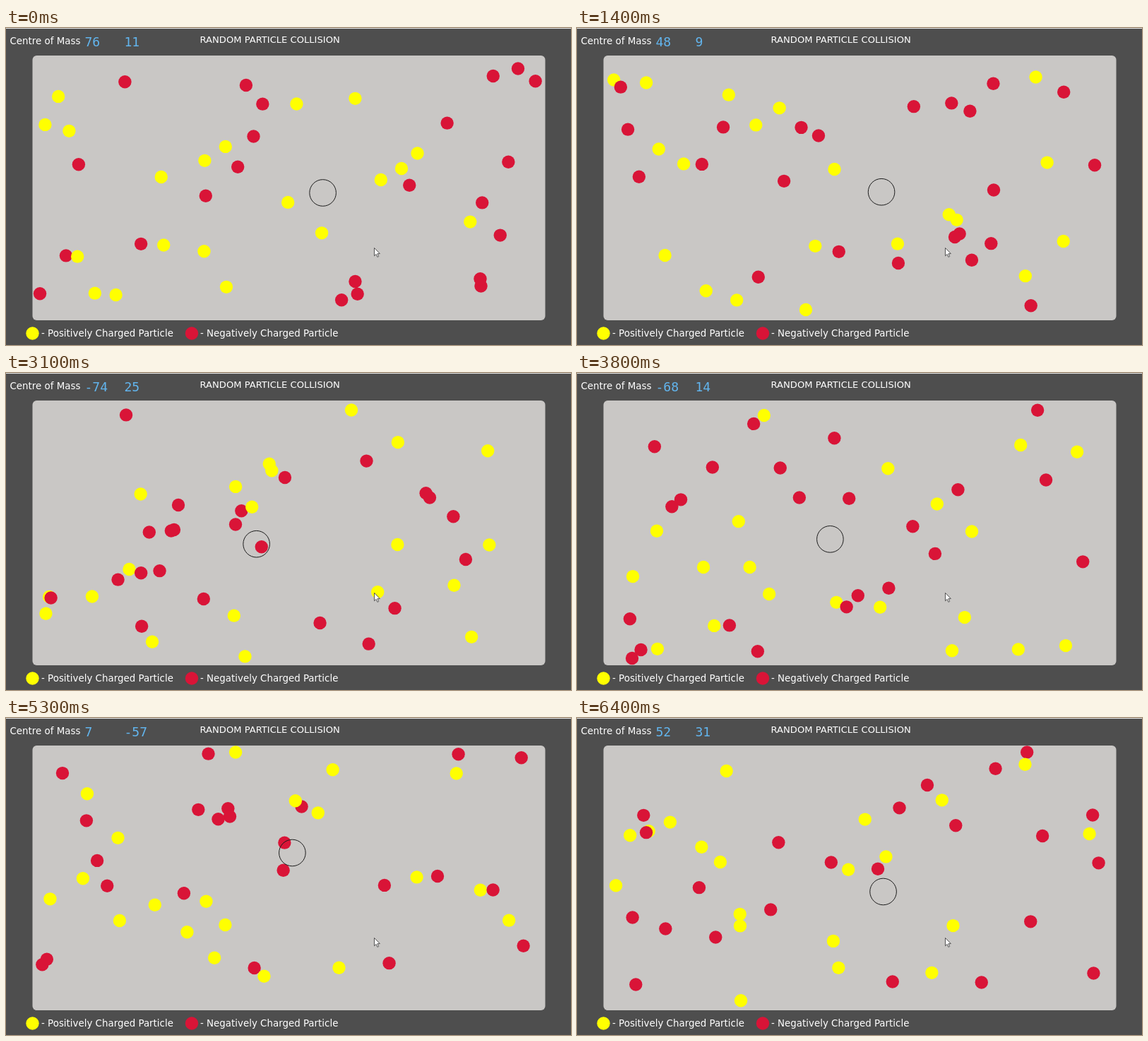
Write an HTML page that moves like this. It is 800x449 px and loops after 6500 ms.

```html
<!DOCTYPE html>
<html lang="en">
<head>
<meta charset="utf-8">
<title>Random Particle Collision</title>
<style>
  html, body { margin: 0; width: 100%; height: 100%; overflow: hidden; background: #4e4e4e; }
  svg { display: block; width: 100%; height: 100%; }
  text { font: 13.4px "DejaVu Sans", sans-serif; fill: #fff; white-space: pre; }
  .title { font-size: 13.1px; }
  .value { font: 18px "DejaVu Sans Mono", monospace; fill: #62b5ee; }
  .pos { fill: #ffff00; }
  .neg { fill: #d91437; }
</style>
</head>
<body>
<svg viewBox="0 0 800 449">
  <rect width="800" height="449" fill="#4e4e4e"/>
  <rect width="800" height="1" fill="#e4e4e4"/>
  <rect x="37.5" y="39" width="726" height="375" rx="6" fill="#c9c7c5"/>
  <text x="5.5" y="23">Centre of Mass</text>
  <text class="title" x="274.5" y="21">RANDOM PARTICLE COLLISION</text>
  <text class="value" id="valueX" x="111.5" y="26"></text>
  <text class="value" id="valueY" x="167.5" y="26"></text>
  <circle class="pos" cx="37.5" cy="432.5" r="9.2"/>
  <text x="50" y="437">- Positively Charged Particle</text>
  <circle class="neg" cx="263" cy="432.5" r="9.2"/>
  <text x="275" y="437">- Negatively Charged Particle</text>
  <g id="particles"></g>
  <circle id="centre" r="18.8" fill="none" stroke="#1c1c1c"/>
  <path d="M521.5 311.5v11.3l2.6-2.4 1.8 4 1.8-.8-1.8-3.9h3.5z" fill="#fff" stroke="#444" stroke-width=".9"/>
</svg>
<script>
const LOOP = 6500, STEP = 100;
const POSITIVE = 20, NEGATIVE = 23;
const BOX = { x: [48, 754], y: [48.5, 404.5] };

// Centre of mass: time, x, y
const centrePath = [
  [0, 76, 11], [1400, 48, 9], [2300, -33, -19], [3100, -74, 25],
  [4400, -62, 5], [5300, 7, -57], [6400, 52, 31]
];

const byId = id => document.getElementById(id);

function set(node, attrs) {
  for (const key in attrs) node.setAttribute(key, attrs[key]);
  return node;
}

let seed = 7;
function random() {
  seed = (seed * 16807) % 2147483647;
  return seed / 2147483647;
}

const between = (low, high) => low + (high - low) * random();
const speed = () => between(4, 22) * (random() < 0.5 ? -1 : 1);

// Folds endless straight travel back and forth between two walls.
function bounce(value, [low, high]) {
  const size = high - low;
  const turn = (((value - low) % (2 * size)) + 2 * size) % (2 * size);
  return low + (turn > size ? 2 * size - turn : turn);
}

function makeParticle(kind) {
  const node = document.createElementNS("http://www.w3.org/2000/svg", "circle");
  byId("particles").append(set(node, { class: kind, r: 9.2 }));
  return { node, x: between(...BOX.x), y: between(...BOX.y), vx: speed(), vy: speed() };
}

const particles = [];
for (let i = 0; i < Math.max(POSITIVE, NEGATIVE); i++) {
  if (i < NEGATIVE) particles.push(makeParticle("neg"));
  if (i < POSITIVE) particles.push(makeParticle("pos"));
}

function centreAt(time) {
  const next = Math.max(1, centrePath.findIndex(point => point[0] >= time));
  const [t0, x0, y0] = centrePath[next - 1], [t1, x1, y1] = centrePath[next];
  const part = (time - t0) / (t1 - t0);
  return [x0 + (x1 - x0) * part, y0 + (y1 - y0) * part].map(Math.round);
}

function draw(time) {
  const step = Math.floor(time / STEP);
  for (const p of particles) {
    set(p.node, {
      cx: bounce(p.x + p.vx * step, BOX.x),
      cy: bounce(p.y + p.vy * step, BOX.y)
    });
  }
  const [x, y] = centreAt(step * STEP);
  set(byId("centre"), { cx: 401 + x * 0.6265, cy: 226.6 + y * 0.625 });
  byId("valueX").textContent = x;
  byId("valueY").textContent = y;
}

const began = performance.now();
function tick() {
  draw((performance.now() - began) % LOOP);
  requestAnimationFrame(tick);
}
tick();
</script>
</body>
</html>
```
